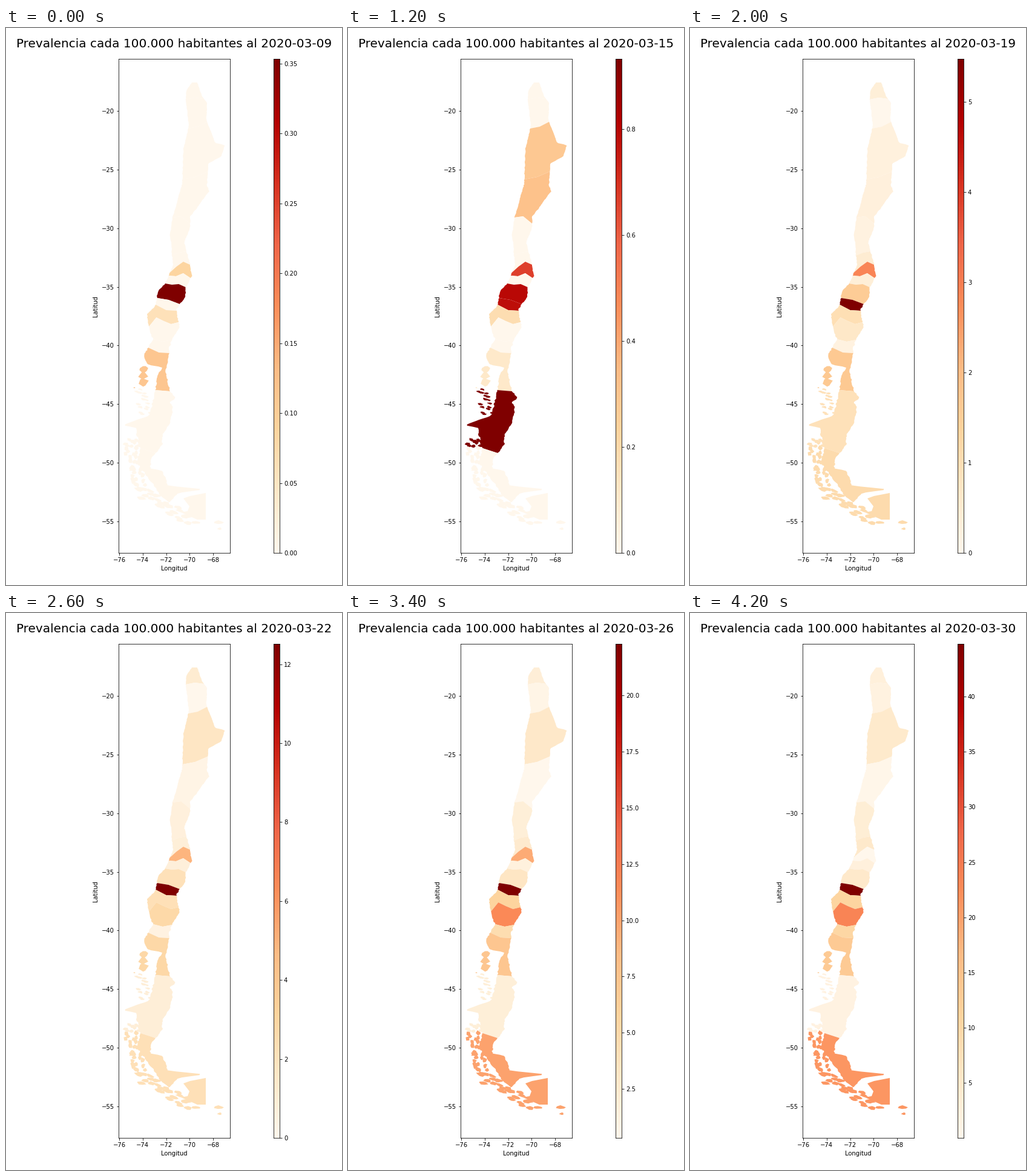
Write a matplotlib script that moves like this. It is 555 px wide and 920 px high and loops after 4.4 s.

```python
import math
import random

import matplotlib.pyplot as plt
import numpy as np
from matplotlib.animation import FuncAnimation
from matplotlib.collections import PolyCollection

W, H, DPI = 555, 920, 72
DAYS, INTERVAL = 22, 200
LEFT, TOP, MAP_W, MAP_H = 185.6, 51.2, 184.6, 816
WEST, NORTH, PX_PER_DEG = -76.08, -15.55, 19.35
CMAP = plt.get_cmap("OrRd")

# Turning points of the two long edges, in stage pixels; seeded noise roughens them
WEST_EDGE = [(307, 90), (298, 103), (297, 118), (302, 162), (293, 200), (291, 258),
             (275, 314), (271, 340), (276, 392), (263, 422), (252, 433), (249, 446),
             (247, 459), (233, 472), (237, 500), (243, 514), (228, 540), (234, 557),
             (258, 560), (250, 576), (247, 600), (237, 640), (193, 656), (214, 660),
             (219, 684), (222, 694), (216, 717), (243, 753), (253, 770), (270, 784)]
EAST_EDGE = [(316, 90), (324, 113), (332, 124), (331, 153), (346, 190), (361, 193),
             (356, 212), (334, 224), (332, 260), (336, 269), (320, 291), (304, 312),
             (304, 331), (294, 353), (303, 386), (307, 410), (297, 428), (296, 444),
             (281, 465), (287, 495), (275, 512), (269, 530), (268, 553), (263, 567),
             (271, 600), (281, 611), (271, 618), (276, 627), (271, 652), (259, 672),
             (258, 688), (239, 712), (238, 728), (259, 731), (267, 756), (329, 762),
             (284, 768), (270, 784)]

# Heights of each region's southern border, evenly spaced from west to east
SOUTH_BORDERS = {
    "Arica": (118, 115, 117),
    "Tarapacá": (166, 163, 155),
    "Antofagasta": (250, 246, 237),
    "Atacama": (313, 311, 323),
    "Coquimbo": (376, 371, 369),
    "Valparaíso": (404, 394, 386, 391),
    "Metropolitana": (409, 410, 405, 413),
    "O'Higgins": (422, 424, 423, 428),
    "Maule": (446, 449, 456),
    "Ñuble": (457, 466, 467),
    "Biobío": (493, 478, 484, 489, 486),
    "Araucanía": (514, 518, 515),
    "Los Ríos": (528, 536, 537),
    "Los Lagos": (598, 600),
    "Aysén": (694, 702),
    "Magallanes": (783, 783),
}

# Chains of islands: region, start, end, count, spread, size, tilt
CHAINS = [
    ("Los Lagos", (228, 558), (227, 590), 3, 1, (16, 14), 0),
    ("Los Lagos", (212, 594), (212, 594), 1, 0, (4, 2), 0),
    ("Aysén", (219, 596), (231, 640), 16, 9, (9, 4), 10),
    ("Aysén", (196, 685), (226, 686), 10, 6, (9, 6), 10),
    ("Magallanes", (205, 692), (221, 758), 28, 10, (8, 8), 10),
    ("Magallanes", (216, 764), (306, 812), 28, 10, (15, 6), 16),
    ("Magallanes", (295, 817), (370, 816), 2, 0, (19, 6), 0),
    ("Magallanes", (353, 827), (353, 827), 1, 0, (8, 4), 0),
]
SOUTHERN_ISLAND = [(304, 773), (330, 768), (330, 812), (316, 812), (289, 800),
                   (300, 798), (303, 790), (293, 777)]

# Population and the days on which the case count changes pace
CASES = {
    "Arica": (252110, {8: 0, 13: 3, 21: 7}),
    "Tarapacá": (382773, {13: 0, 21: 8}),
    "Antofagasta": (691854, {5: 0, 6: 2, 10: 2, 13: 12, 21: 34}),
    "Atacama": (314709, {5: 0, 6: 1, 13: 1, 21: 2}),
    "Coquimbo": (836096, {8: 0, 13: 6, 21: 30}),
    "Valparaíso": (1960170, {6: 0, 13: 18, 21: 100}),
    "Metropolitana": (8125072, {0: 7, 4: 29, 6: 54, 10: 234, 13: 398, 21: 1300}),
    "O'Higgins": (991063, {7: 0, 13: 8, 21: 25}),
    "Maule": (1131939, {0: 4, 4: 8, 6: 9, 13: 24, 21: 58}),
    "Ñuble": (511551, {2: 0, 3: 2, 6: 4, 8: 24, 10: 28, 13: 64, 16.36: 114, 21: 229}),
    "Biobío": (1663696, {3: 1, 4: 3, 8: 3, 13: 37, 21: 182}),
    "Araucanía": (1014343, {9: 0, 13: 28, 21: 241}),
    "Los Ríos": (405835, {8: 0, 13: 2, 21: 42}),
    "Los Lagos": (891440, {6: 1, 13: 25, 21: 120}),
    "Aysén": (107297, {5: 0, 6: 1, 13: 1, 16: 2}),
    "Magallanes": (178362, {7: 0, 8: 2, 11: 2, 13: 4, 21: 38}),
}


def prevalence(name, day):
    population, known = CASES[name]
    # Growth quickens over the last eight days
    if day > 13:
        day = 13 + 8 * ((day - 13) / 8) ** 1.25
    count = round(np.interp(day, list(known), list(known.values())))
    # Thousands separator read as a decimal point
    if count >= 1000:
        count /= 1000
    return count / population * 1e5


def rough_edge(points, seed):
    noise = np.random.default_rng(seed)
    px, py = zip(*points)
    y = np.arange(90, 785, 2)
    swing = np.interp(y, (90, 450, 784), (0.5, 1, 1.8))
    return y, np.interp(y, py, px) + swing * noise.uniform(-1, 1, len(y))


def along(edge, y0, y1):
    y = np.linspace(y0, y1, 2 + int(abs(y1 - y0) / 2))
    return list(zip(np.interp(y, *edge), y))


def border(levels):
    x0 = np.interp(levels[0], *west)
    x1 = np.interp(levels[-1], *east)
    return list(zip(np.linspace(x0, x1, len(levels)), levels))


def mainland(north, south):
    return (border(north) + along(east, north[-1], south[-1])
            + border(south)[::-1] + along(west, south[0], north[0]))


def islet(x, y, size, tilt):
    c, s = math.cos(math.radians(tilt)), math.sin(math.radians(tilt))
    points = []
    for k in range(7):
        a = math.tau * (k + rng.uniform(-0.4, 0.4)) / 7
        r = rng.uniform(0.65, 1.15) / 2
        u, v = r * size[0] * math.cos(a), r * size[1] * math.sin(a)
        points.append((x + u * c - v * s, y + u * s + v * c))
    return points


def chain(start, end, count, spread, size, tilt):
    dx, dy = end[0] - start[0], end[1] - start[1]
    length = math.hypot(dx, dy) or 1
    islets = []
    for k in range(count):
        t = (k + 0.5) / count
        off = rng.uniform(-spread, spread) / length
        islets.append(islet(start[0] + t * dx - off * dy,
                            start[1] + t * dy + off * dx, size, tilt))
    return islets


def to_degrees(points):
    return [(WEST + (x - LEFT) / PX_PER_DEG, NORTH - (y - TOP) / PX_PER_DEG)
            for x, y in points]


def stage_axes(x, y, w, h):
    return fig.add_axes([x / W, 1 - (y + h) / H, w / W, h / H])


rng = random.Random(4)
west, east = rough_edge(WEST_EDGE, 1), rough_edge(EAST_EDGE, 2)
shapes = {}
north = (90, 90)
for name, south in SOUTH_BORDERS.items():
    shapes[name] = [mainland(north, south)]
    north = south
for name, *layout in CHAINS:
    shapes[name] += chain(*layout)
shapes["Magallanes"].append(SOUTHERN_ISLAND)

fig = plt.figure(figsize=(W / DPI, H / DPI), dpi=DPI, facecolor="white")
title = fig.text(0.5, 1 - 32 / H, "", size=20, ha="center", va="baseline")

ax = stage_axes(LEFT, TOP, MAP_W, MAP_H)
ax.set_xlabel("Longitud")
ax.set_ylabel("Latitud")

regions = {}
for name, polygons in shapes.items():
    regions[name] = PolyCollection([to_degrees(p) for p in polygons], linewidths=0)
    ax.add_collection(regions[name])

ax.set_xlim(WEST, WEST + MAP_W / PX_PER_DEG)
ax.set_ylim(NORTH - MAP_H / PX_PER_DEG, NORTH)
ax.set_xticks(range(-76, -67, 2))
ax.set_yticks(range(-55, -19, 5))

cax = stage_axes(442, TOP, 10, MAP_H)
bar = cax.imshow(np.linspace(0, 1, 256)[:, None], cmap=CMAP, aspect="auto",
                 origin="lower", extent=(0, 1, 0, 1))
cax.set_xticks([])
cax.yaxis.tick_right()


def draw(day):
    values = {name: prevalence(name, day) for name in regions}
    low, high = min(values.values()), max(values.values())
    for name, region in regions.items():
        region.set_facecolor(CMAP((values[name] - low) / (high - low)))
    bar.set_extent((0, 1, low, high))
    cax.set_ylim(low, high)
    title.set_text(f"Prevalencia cada 100.000 habitantes al 2020-03-{9 + day:02d}")
    return [title, bar, *regions.values()]


anim = FuncAnimation(fig, draw, frames=DAYS, init_func=lambda: draw(0),
                     interval=INTERVAL, repeat=True, repeat_delay=0, blit=False)
plt.show()
```
